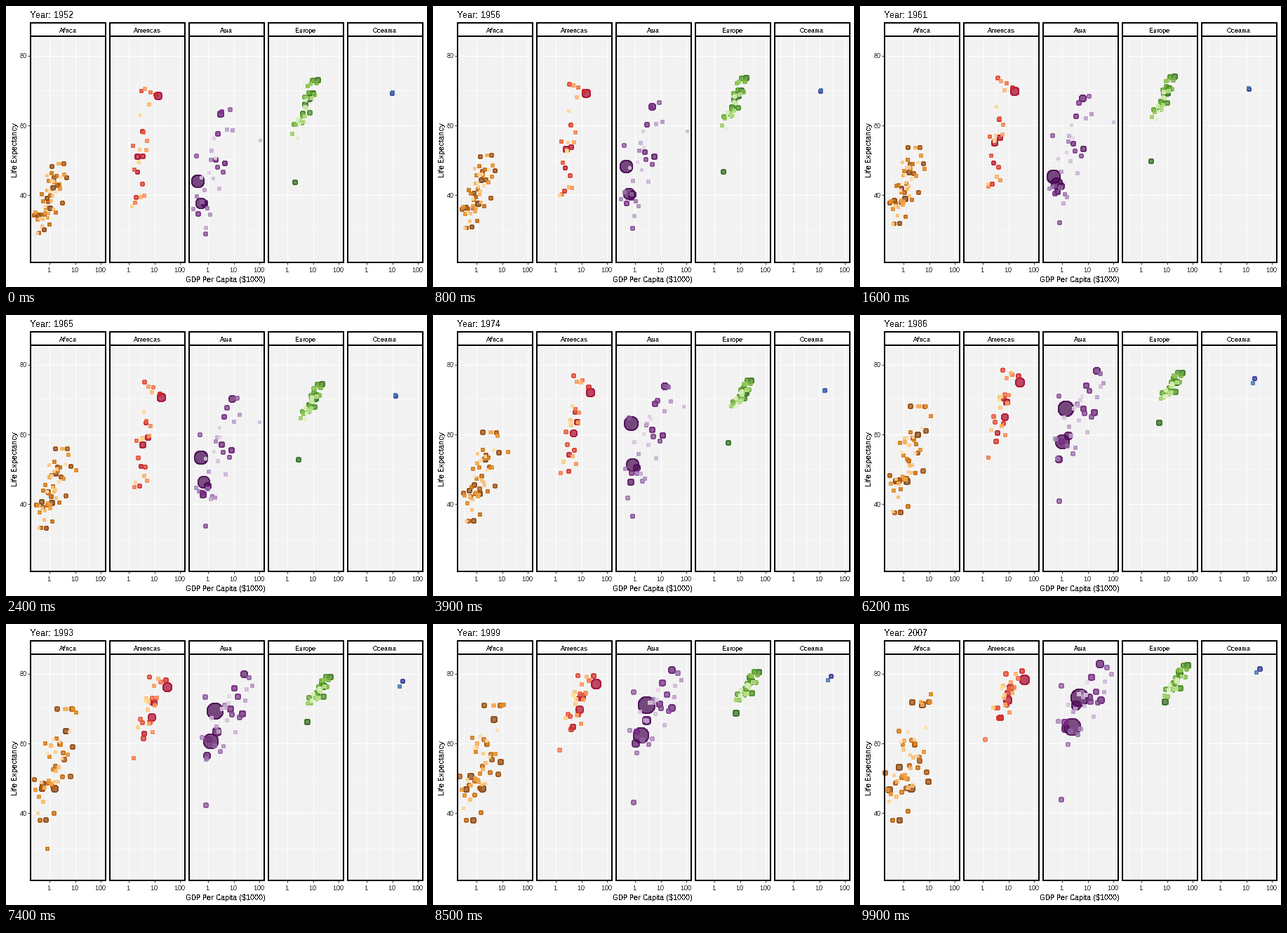
These frames come from a looping animation (600 px wide and 400 px high, 10 s). A matplotlib script:

```python
import matplotlib.pyplot as plt
import numpy as np
from matplotlib.animation import FuncAnimation
from matplotlib.colors import to_rgb
from matplotlib.patches import Rectangle

FRAMES = 100
PX = 0.72  # points per pixel at 100 dpi
PANEL_W, PITCH, LEFT, TOP, BOTTOM = 107, 113, 35, 43, 365
LOG_LO, LOG_HI = -0.752, 2.189
LIFE_LO, LIFE_HI = 20.65, 85.55
YEARS = np.linspace(1952, 2007, FRAMES)

rng = np.random.default_rng(7)


def track(*values):
    """Straight moves between evenly spaced values over the whole loop."""
    return np.interp(YEARS, np.linspace(1952, 2007, len(values)), values)


def growth(first, last):
    return first * (last / first) ** track(0, 1)


def lead(pop, gdp, life, dip=None):
    """A large or outlying country: population in millions, GDP in $1000."""
    ages = track(*life)
    if dip:
        year, depth = dip
        ages = ages - depth * np.clip(1 - abs(YEARS - year) / 5, 0, 1)
    return growth(*pop), track(*np.log10(gdp)), ages


def scores(n):
    """Shuffled, evenly filled, roughly normal scores."""
    u = rng.permutation(np.linspace(-1, 1, n))
    return 1.2 * u + 0.9 * u ** 3


def crowd(n, top, fall, past, gdp, gdp_sd, life, life_sd, rho):
    """Smaller countries around a moving mean; richer ones live longer."""
    wealth, early, late = scores(n), scores(n), scores(n)
    health = np.sqrt(1 - rho ** 2)
    turn = track(0, 1) * np.pi / 4
    for k in range(n):
        other = early[k] * np.cos(turn) + late[k] * np.sin(turn)
        score = np.clip(rho * wealth[k] + health * other, -2, 2)
        pop = top * np.exp(-fall * k / n)
        yield (growth(past * pop, pop),
               track(*gdp) + track(*gdp_sd) * wealth[k],
               track(*life) + track(*life_sd) * score)


africa = [
    lead((33, 135), (1.08, 1.3, 1.4, 2.01), (36, 42, 47, 47)),
    lead((22, 80), (1.42, 1.9, 3.9, 5.6), (42, 51, 61, 71)),
    lead((21, 76), (0.36, 0.55, 0.5, 0.69), (34, 43, 47, 53)),
    lead((14, 65), (0.78, 0.9, 0.62, 0.28), (39, 45, 47, 46.5)),
    lead((14, 44), (4.7, 7.6, 7.7, 9.3), (45, 53, 62, 49)),
    lead((2.5, 8.9), (0.49, 0.6, 0.8, 0.86), (40, 45, 44, 46), (1992, 19)),
    lead((1, 6), (2.4, 20, 11, 12), (43, 52, 67, 74)),
    *crowd(45, 45, 5, 0.28, (0, 0.15, 0.17, 0.18), (0.28, 0.31, 0.35, 0.42),
           (39, 46.5, 53.5, 54.8), (5, 6, 7.8, 8.5), 0.5),
]
americas = [
    lead((158, 301), (14, 21, 31, 43), (68.4, 71.2, 75.2, 78.2)),
    lead((57, 190), (2.1, 4.5, 7.7, 9.1), (51, 59, 65.6, 72.4)),
    lead((30, 109), (3.5, 6.5, 8.9, 12), (51, 62, 70, 76)),
    lead((15, 33), (11.4, 18, 26.5, 36), (68.8, 72.6, 77.2, 80.7)),
    lead((3.2, 8.5), (1.84, 1.6, 1.7, 1.2), (37.6, 47.5, 54, 61)),
    *crowd(20, 45, 3.8, 0.3, (0.48, 0.66, 0.77, 0.9), (0.18, 0.17, 0.2, 0.23),
           (53, 61.5, 69, 73.5), (9, 7.5, 4.8, 3.2), 0.5),
]
asia = [
    lead((556, 1319), (0.4, 0.5, 0.7, 1.25, 2.25, 5), (44, 54.5, 63.4, 67, 70, 73), (1962, 9.5)),
    lead((372, 1110), (0.55, 0.72, 1.05, 2.45), (37.4, 49.5, 59, 64.7)),
    lead((82, 224), (0.75, 1, 1.9, 3.5), (37.5, 48, 61, 70.7)),
    lead((47, 150), (0.68, 0.65, 0.77, 1.39), (37.5, 44.5, 54, 64)),
    lead((87, 127), (3.2, 13, 23.5, 31.7), (63, 72.7, 78.9, 82.6)),
    lead((8.4, 32), (0.78, 0.76, 0.78, 0.97), (28.8, 35.4, 41.5, 43.8)),
    lead((4.7, 14), (0.37, 0.48, 0.68, 1.7), (39.4, 45, 54, 59.7), (1977, 15)),
    lead((0.2, 2.5), (108, 100, 29, 47), (55.6, 66.5, 74.6, 77.6)),
    *crowd(25, 110, 4.8, 0.3, (0.19, 0.48, 0.7, 0.88), (0.37, 0.42, 0.46, 0.5),
           (47.5, 57.5, 67, 72), (8.5, 7.5, 5.5, 4.8), 0.65),
]
europe = [
    lead((69, 82), (7.1, 16, 25, 32), (67.5, 71, 75.2, 79.4)),
    lead((22, 71), (2, 3.2, 5.3, 8.5), (43.6, 56, 64.2, 71.8)),
    lead((50, 61), (10, 15, 22, 33), (69.2, 71.8, 75.5, 79.4)),
    lead((48, 58), (4.9, 11.5, 20, 28.6), (65.9, 71.8, 76.6, 80.5)),
    *crowd(26, 60, 4.5, 0.7, (0.69, 1.03, 1.2, 1.36), (0.24, 0.18, 0.2, 0.22),
           (65, 70.7, 74, 77.6), (4.4, 2, 2, 2.3), 0.88),
]
oceania = [
    lead((8.7, 20.4), (10, 15.5, 22.5, 34.4), (69.1, 71.6, 76.6, 81.2)),
    lead((2, 4.1), (10.6, 15.3, 18.8, 25.2), (69.4, 71.8, 74.9, 80.2)),
]

PANELS = {
    "Africa": (africa, "#7F3B08 #B35806 #E08214 #FDB863 #FEE0B6"),
    "Americas": (americas, "#A50026 #D73027 #F46D43 #FDAE61 #FEE090"),
    "Asia": (asia, "#40004B #762A83 #9970AB #C2A5CF #E7D4E8"),
    "Europe": (europe, "#276419 #4D9221 #7FBC41 #B8E186 #E6F5D0"),
    "Oceania": (oceania, "#313695 #4575B4"),
}

plt.rcParams.update({
    "font.family": "Liberation Sans",
    "text.antialiased": False,
    "text.hinting": "native",
    "text.hinting_factor": 1,
})
fig = plt.figure(figsize=(6, 4), dpi=100, facecolor="white")
ax = fig.add_axes([0, 0, 1, 1])
ax.set(xlim=(0, 600), ylim=(400, 0))
ax.axis("off")


def to_x(left, log_gdp):
    return left + (log_gdp - LOG_LO) / (LOG_HI - LOG_LO) * PANEL_W


def to_y(life):
    return TOP + (LIFE_HI - life) / (LIFE_HI - LIFE_LO) * (BOTTOM - TOP)


def line(x, y, width, color="white"):
    ax.plot(x, y, color=color, lw=width * PX, zorder=1, solid_capstyle="butt")


def box(x, y, h, width, z, **style):
    ax.add_patch(Rectangle((x, y), PANEL_W, h, lw=width * PX, zorder=z, **style))


def label(x, y, text, size, ha="center", color="black", **kw):
    return ax.text(x, y, text, fontsize=size * PX, ha=ha, va="baseline", color=color, **kw)


def panel(left, name):
    right = left + PANEL_W
    box(left, TOP, BOTTOM - TOP, 0, 0, fc="#F2F2F2", ec="none")
    for life in range(30, 81, 10):
        line([left, right], [to_y(life)] * 2, 0.6 if life % 20 else 1)
    for half in range(-1, 5):
        x = to_x(left, half / 2)
        line([x, x], [TOP, BOTTOM], 0.6 if half % 2 else 1)
        if half % 2 == 0:
            line([x, x], [BOTTOM, BOTTOM + 3], 1, "#333333")
            label(x - 0.8, 379, str(10 ** (half // 2)), 9, color="#4D4D4D")
    box(left, TOP, BOTTOM - TOP, 2, 4, fc="none", ec="black")
    box(left, 24, TOP - 24, 2, 5, fc="white", ec="black")
    label(left + PANEL_W / 2 - 0.5, 38, name, 9, zorder=6)


xs, ys, pops, colors = [], [], [], []
for k, (name, (members, anchors)) in enumerate(PANELS.items()):
    left = LEFT + k * PITCH
    panel(left, name)
    # the most populous country of 2007 gets the darkest shade
    rank = np.argsort(np.argsort([-pop[-1] for pop, _, _ in members]))
    stops = np.array([to_rgb(a) for a in anchors.split()])
    place = rank / (len(members) - 1) * (len(stops) - 1)
    for spot, (pop, gdp, life) in zip(place, members):
        xs.append(to_x(left, gdp))
        ys.append(to_y(life))
        pops.append(pop)
        colors.append([np.interp(spot, range(len(stops)), c) for c in stops.T] + [0.7])

for life in (40, 60, 80):
    line([LEFT - 4, LEFT - 1], [to_y(life)] * 2, 1, "#333333")
    label(30, to_y(life) + 3.8, str(life), 9, "right", "#4D4D4D")
label(313.5, 393, "GDP Per Capita ($1000)", 11)
label(16, 205, "Life Expectancy", 11, rotation=90, rotation_mode="anchor")
title = label(34.5, 17, "", 13, "left")

# dots sit on whole pixels, with area following population
size = 2 + 10 * np.sqrt(np.array(pops) / 1319)
diam = np.floor(0.75 * (size * 2.845 + 0.94) + 0.5)
cx = np.floor(xs) + diam % 2 / 2
cy = np.floor(ys) + diam % 2 / 2
area = ((diam - 1) * PX) ** 2
dots = ax.scatter(cx[:, 0], cy[:, 0], s=area[:, 0], c=colors, edgecolors=colors,
                  linewidths=PX, antialiased=False, zorder=3)


def draw(i):
    title.set_text(f"Year: {round(YEARS[i])}")
    dots.set_offsets(np.column_stack([cx[:, i], cy[:, i]]))
    dots.set_sizes(area[:, i])
    return dots, title


anim = FuncAnimation(fig, draw, frames=FRAMES, interval=100, repeat=True)
plt.show()
```
